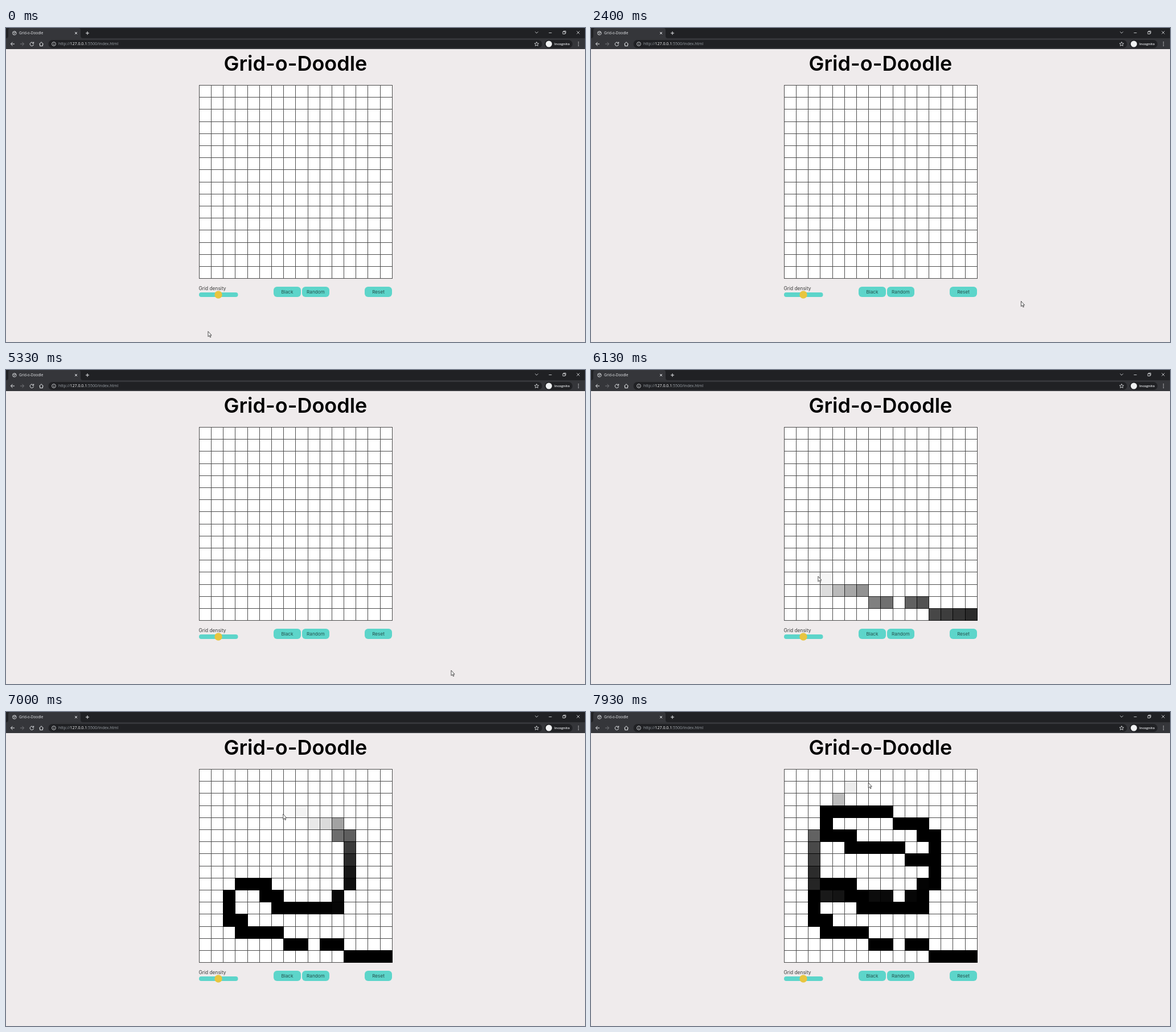
Animation, 1017 px wide and 551 px high, one loop 8000 ms. Source, as an HTML page:

```html
<!DOCTYPE html>
<html lang="en">
<head>
<meta charset="utf-8">
<title>Grid-o-Doodle</title>
<style>
  html, body { margin: 0; width: 100%; height: 100%; overflow: hidden; background: #efebec; }
  svg { display: block; width: 1017px; height: 551px; }
  text { font-family: Inter, "Open Sans", sans-serif; }
  .ui { font-family: "Open Sans", "Noto Sans", sans-serif; font-size: 6.4px; fill: #e8eaed; }
  .url { font-size: 7px; fill: #9aa0a6; }
  .url .host { fill: #f4f5f6; }
  .title { font-size: 36px; font-weight: 600; text-anchor: middle; }
  .label { font-size: 8.4px; fill: #3a3a3a; }
  .button { fill: #5dd5ca; }
  .caption { font-size: 8.2px; text-anchor: middle; fill: #24504c; }
  .icon { fill: none; stroke: #e8eaed; stroke-width: 1; }
  .thin { stroke-width: .8; }
  .dim { stroke: #77787c; }
  #lines { fill: none; stroke: #000; stroke-opacity: .7; }
</style>
</head>
<body>
<svg viewBox="0 0 1017 551">
  <!-- browser window -->
  <rect width="1017" height="18" fill="#202124"/>
  <rect y="18" width="1017" height="19" fill="#35363a"/>
  <path d="M0 18Q4 18 4 14V4Q4 0 8 0H127Q131 0 131 4V14Q131 18 135 18Z" fill="#35363a"/>
  <g class="icon thin">
    <circle cx="14.8" cy="9" r="3.3"/>
    <path d="M12 7.2L15 8.5L13.8 11.8M15.2 5.9L16.5 8.3L17.8 9"/>
  </g>
  <text class="ui" x="23" y="11.3">Grid-o-Doodle</text>
  <path class="icon" d="M121 7L125 11M125 7L121 11M140 9H146M143 6V12"/>
  <path class="icon thin" d="M929.3 6.5L932 9.2L934.7 6.5M953.5 8.5H958.5M978 6.5H982V10.5H978ZM979.3 6.5V5.3H983.2V9.3H982M1002.5 5.5L1007.5 10.5M1007.5 5.5L1002.5 10.5"/>
  <path class="icon" d="M15 28H8.6M11.6 24.8L8.4 28L11.6 31.2"/>
  <path class="icon dim" d="M25 28H31.4M28.4 24.8L31.6 28L28.4 31.2"/>
  <path class="icon" d="M47.6 26A3.2 3.2 0 1 0 48.5 28.8M48.6 24.4V27H46"/>
  <path class="icon" d="M58.3 28.3L62 24.7L65.7 28.3M59.6 27.5V31.5H64.4V27.5"/>
  <rect x="74.5" y="21" width="867" height="14" rx="7" fill="#202124"/>
  <g class="icon thin">
    <circle cx="84" cy="28" r="3.4"/>
    <path d="M84 27.5V30M84 25.8V26.6"/>
  </g>
  <text class="ui url" x="92" y="30.3">http://<tspan class="host">127.0.0.1</tspan>:5500/index.html</text>
  <path class="icon thin" d="M932 24.4L933.1 26.9L935.7 27.1L933.7 28.8L934.3 31.4L932 30L929.7 31.4L930.3 28.8L928.3 27.1L930.9 26.9Z"/>
  <rect x="946" y="21" width="49" height="14" rx="7" fill="#202124"/>
  <circle cx="953.5" cy="28" r="5.5" fill="#f1f3f4"/>
  <text class="ui" x="963" y="30.3" font-weight="600" style="font-size:6px">Incognito</text>
  <g fill="#e8eaed">
    <circle cx="1005.5" cy="25" r=".8"/><circle cx="1005.5" cy="28" r=".8"/><circle cx="1005.5" cy="31" r=".8"/>
  </g>

  <!-- page -->
  <text class="title" x="508.5" y="75">Grid-o-Doodle</text>
  <rect x="339" y="100" width="340" height="340" fill="#fff"/>
  <g id="cells" shape-rendering="crispEdges"></g>
  <path id="lines" shape-rendering="crispEdges"/>

  <text class="label" x="338.5" y="459.5">Grid density</text>
  <rect class="button" x="339" y="464" width="68.5" height="8" rx="4"/>
  <circle cx="373" cy="468" r="6.7" fill="#e8c53f"/>
  <g class="button">
    <rect x="470" y="454" width="48" height="18" rx="6"/>
    <rect x="520" y="454" width="48" height="18" rx="6"/>
    <rect x="630" y="454" width="48" height="18" rx="6"/>
  </g>
  <g class="caption">
    <text x="494" y="466.3">Black</text>
    <text x="544" y="466.3">Random</text>
    <text x="654" y="466.3">Reset</text>
  </g>

  <path id="cursor" d="M.3 0V9.2L2.4 7.3L3.8 10.5L5.2 9.9L3.8 6.8H6.4Z" fill="#fff" stroke="#222" stroke-width=".8"/>
</svg>
<script>
const LOOP = 8000, FADE = 500, MOUSE_STEP = 17;
const COUNT = 16, SIZE = 21.19, LEFT = 338.8, TOP = 100.1;

// Pointer key points in grid units: [column, row, time]
const roam = [
  [0.75, 20.4, 930], [16.5, 19.1, 1730], [22.4, 17.5, 2060], [19.65, 17.9, 2400],
  [21.3, 20.7, 2860], [20.4, 19.8, 3130], [24.1, 15.7, 3730], [25, 16.3, 3860],
  [20.9, 20.15, 4260], [20.9, 20.15, 5330], [20.2, 19.4, 5600]
];
const sketch = [
  [15.9, 15.8, 5865], [5.37, 13.6, 6018], [3.6, 13.25, 6075], [2.82, 12.36, 6130],
  [2.95, 10.05, 6300], [3.4, 9.5, 6340], [5.4, 9.4, 6410], [6.6, 11.6, 6485],
  [11.3, 11.6, 6590], [12.4, 9.4, 6660], [12.05, 5.7, 6820], [11.4, 4.4, 6915],
  [6.97, 3.73, 7000], [3.5, 3.5, 7120], [3.2, 5.5, 7225], [11.4, 7.35, 7425],
  [12.6, 8.3, 7460], [11.5, 9.6, 7500], [10.5, 10.4, 7530], [4.35, 10.67, 7600],
  [2.7, 9.7, 7645], [2.97, 5.03, 7765], [4.4, 2.5, 7850], [5.4, 1.6, 7895], [6.99, 1.13, 7930]
];
const path = [...roam, ...sketch];

const gridX = c => LEFT + c * SIZE;
const gridY = r => TOP + r * SIZE;
const mix = (a, b, p) => a + (b - a) * p;

function pointer(t) {
  const i = path.findIndex(p => p[2] >= t);
  if (i < 0) return path[path.length - 1];
  if (i === 0) return path[0];
  const a = path[i - 1], b = path[i];
  const p = (t - a[2]) / (b[2] - a[2]);
  return [mix(a[0], b[0], p), mix(a[1], b[1], p)];
}

let lines = "";
for (let i = 0; i <= COUNT; i++) {
  const x = Math.round(gridX(i)) + .5, y = Math.round(gridY(i)) + .5;
  lines += `M${x} 100V440M339 ${y}H679`;
}
document.getElementById("lines").setAttribute("d", lines);

function addCell(col, row) {
  const el = document.createElementNS("http://www.w3.org/2000/svg", "rect");
  const x = Math.round(gridX(col)), y = Math.round(gridY(row));
  const attrs = {
    x, y,
    width: Math.round(gridX(col + 1)) - x + 1,
    height: Math.round(gridY(row + 1)) - y + 1
  };
  for (const key in attrs) el.setAttribute(key, attrs[key]);
  return document.getElementById("cells").appendChild(el);
}

// Mouse events come at a fixed rate, so fast moves skip cells
const cells = new Map();
for (let t = 0; t < LOOP; t += MOUSE_STEP) {
  const [col, row] = pointer(t).map(Math.floor);
  const key = col + "," + row;
  if (col >= COUNT || row >= COUNT || cells.has(key)) continue;
  cells.set(key, { el: addCell(col, row), time: t });
}

// The CSS "ease" curve, solved by bisection
function ease(p) {
  if (p <= 0) return 0;
  if (p >= 1) return 1;
  const curve = (a, b, s) => 3 * a * s * (1 - s) ** 2 + 3 * b * s * s * (1 - s) + s ** 3;
  let lo = 0, hi = 1;
  for (let i = 0; i < 18; i++) {
    const mid = (lo + hi) / 2;
    if (curve(.25, .25, mid) < p) lo = mid; else hi = mid;
  }
  return curve(.1, 1, lo);
}

// The screen updates 15 times per second, on a 10 ms clock
const tick = k => 10 * Math.floor(k * 20 / 3);
function snap(t) {
  const k = Math.floor(t * .015) + 1;
  return tick(k) > t ? tick(k - 1) : tick(k);
}

const cursor = document.getElementById("cursor");
function draw(now) {
  const t = snap(now % LOOP);
  for (const { el, time } of cells.values()) el.setAttribute("opacity", ease((t - time) / FADE));
  const [col, row] = pointer(t);
  cursor.setAttribute("transform", `translate(${gridX(col).toFixed(2)} ${gridY(row).toFixed(2)})`);
  requestAnimationFrame(draw);
}
draw(performance.now());
</script>
</body>
</html>
```
